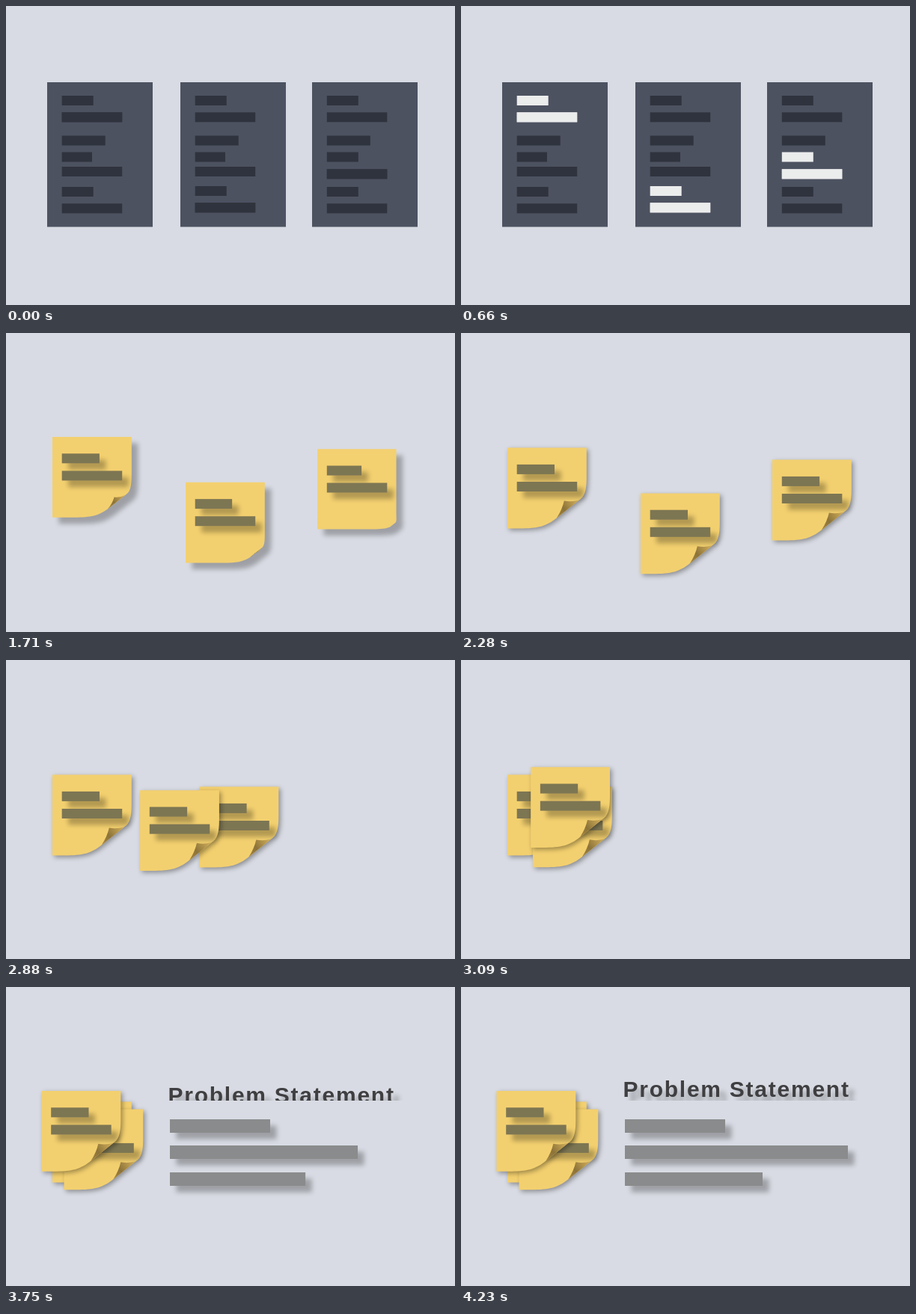
An HTML page with a canvas for the animation above (6.12 s loop, 600 by 400 pixels).

```html
<!DOCTYPE html>
<html lang="en">
<head>
<meta charset="utf-8">
<title>Problem Statement</title>
<style>
  html, body { margin: 0; width: 100%; height: 100%; overflow: hidden; background: #d8dbe3; }
  canvas { display: block; }
</style>
</head>
<body>
<canvas id="stage" width="600" height="400"></canvas>
<script>
const ctx = document.getElementById('stage').getContext('2d');
const LOOP = 6120;
const BG = '#d8dbe3', PAPER = '#4d5261';
const DARK = [47, 51, 61], WHITE = [255, 255, 255];
const YELLOW = [243, 208, 111], OLIVE = [125, 118, 83];
const STAGGER = 44, BAR = 13;

// Bars are [y, width]; "pick" is the first of the two bars that become a note.
const papers = [
  { x: 55, barX: 74.7, pick: 0, note: [62, 139],
    bars: [[120, 42], [142.3, 80.5], [173.5, 58], [195.5, 40.3], [215, 80.5], [242, 42], [264.3, 80.5]] },
  { x: 233, barX: 252.7, pick: 5, note: [240, 199.8],
    bars: [[120, 42], [142.3, 80.5], [173.5, 58], [195.5, 40.3], [215, 80.5], [241, 42], [263.3, 80.5]] },
  { x: 409, barX: 428.8, pick: 3, note: [416, 155],
    bars: [[120, 42], [142.3, 80.5], [173.5, 58], [195.5, 42], [218.3, 80.5], [242, 42], [264.3, 80.5]] }
];

const progress = (t, start, length) => Math.max(0, Math.min(1, (t - start) / length));
const lerp = (a, b, p) => a + (b - a) * p;
const sine = p => (1 - Math.cos(Math.PI * p)) / 2;
const quart = p => p < 0.5 ? 8 * p ** 4 : 1 - 8 * (1 - p) ** 4;
const cubicOut = p => 1 - (1 - p) ** 3;
const mix = (a, b, p) => `rgb(${a.map((v, i) => Math.round(lerp(v, b[i], p)))})`;

function rect(x, y, w, h, color) {
  ctx.fillStyle = color;
  ctx.fillRect(x, y, w, h);
}

function setShadow(alpha, offset, blur) {
  ctx.shadowColor = `rgba(0,0,0,${alpha})`;
  ctx.shadowOffsetX = ctx.shadowOffsetY = offset;
  ctx.shadowBlur = blur;
}

function drawPaper(paper, alpha) {
  ctx.globalAlpha = alpha;
  rect(paper.x, 102, 141, 193.5, PAPER);
  paper.bars.forEach(([y, w], i) => {
    if (i !== paper.pick && i !== paper.pick + 1) rect(paper.barX, y, w, BAR, mix(DARK, DARK, 0));
  });
  ctx.globalAlpha = 1;
}

// Sheet whose lower right corner is curled up by c (0..1).
function drawSheet(w, h, c, color, shadow) {
  const ax = w - 10 * c, ay = h - 38 * c;
  const bx = w - 40 * c, by = h - 14 * c;
  const s = Math.sqrt(c);
  ctx.beginPath();
  ctx.moveTo(0, 0);
  ctx.lineTo(w, 0);
  ctx.lineTo(w, ay - 30 * s);
  ctx.bezierCurveTo(w, ay - 12 * s, ax + 7 * s, ay - 4 * s, ax, ay);
  ctx.lineTo(bx, by);
  ctx.bezierCurveTo(bx - 14 * s, by + 11 * c, bx - 24 * s, h, bx - 50 * s, h);
  ctx.lineTo(0, h);
  ctx.closePath();
  ctx.fillStyle = color;
  setShadow(...shadow);
  ctx.fill();
  setShadow(0, 0, 0);

  const q = (c - 0.5) * 2;
  if (q <= 0) return;
  const tipX = lerp(w - 13, w - 30, q), tipY = lerp(h - 13, h - 37, q);
  const shade = ctx.createLinearGradient(bx, by, ax, ay);
  shade.addColorStop(0, '#a3853f');
  shade.addColorStop(0.4, '#8c7339');
  shade.addColorStop(1, '#d8b45d');
  ctx.beginPath();
  ctx.moveTo(bx, by);
  ctx.quadraticCurveTo(lerp(bx, tipX, 0.75), lerp(by, tipY, 0.5), tipX, tipY);
  ctx.quadraticCurveTo(lerp(tipX, ax, 0.5), tipY + 2 * q, ax, ay);
  ctx.closePath();
  ctx.fillStyle = shade;
  ctx.fill();
}

// Where the finished note sits, including the drop and the gathering into a pile.
function notePosition(i, t, drop) {
  let [x, y] = papers[i].note;
  y += 14.6 * drop;
  if (i === 1) {
    const p = sine(progress(t, 2610, 710));
    x = lerp(x, 47.5, p);
    y = lerp(139, y, (1 - p) ** 2);
  } else if (i === 2) {
    x = lerp(x, 77.5, sine(progress(t, 2610, 565)));
    y = lerp(y, 163.5, sine(progress(t, 3080, 160)));
  }
  return [x, y];
}

function drawNote(i, t) {
  const { barX, bars, pick, note } = papers[i];
  const delay = STAGGER * i;
  const [shortBar, longBar] = [bars[pick], bars[pick + 1]];
  const lit = sine(progress(t, 420, 300));
  const grow = quart(progress(t, 1143 + delay, 570));
  const curl = quart(progress(t, 1445 + delay, 440));
  const write = quart(progress(t, 1321 + delay, 440));
  const drop = sine(progress(t, 1765 + delay, 420));

  const [endX, endY] = notePosition(i, t, drop);
  const x = lerp(barX, endX, grow), y = lerp(shortBar[0], endY, grow);
  const w = lerp(shortBar[1], 105.8, grow), h = lerp(BAR, 107.8, grow);
  const lineX = barX + endX - note[0];
  const lineY = lerp(longBar[0], endY + 45.4, grow);
  const sheetColor = grow > 0 ? mix(WHITE, YELLOW, grow) : mix(DARK, WHITE, lit);
  const lineColor = grow > 0 ? mix(WHITE, OLIVE, grow) : mix(DARK, WHITE, lit);
  const shadow = [lerp(0.27, 0.36, drop) * Math.min(1, grow * 4), lerp(8.5, 2.5, drop), 6];

  if (grow < 0.9) {
    setShadow(...shadow);
    rect(lineX, lineY, longBar[1], BAR, lineColor);
  }
  ctx.save();
  ctx.translate(x, y);
  drawSheet(w, h, curl, sheetColor, shadow);
  ctx.restore();
  rect(lineX, y + 22.3, 50.3 * write, BAR, mix(OLIVE, OLIVE, 0));
  rect(lineX, lineY, longBar[1], BAR, lineColor);
}

function drawStatement(t) {
  const rise = 30 * (1 - cubicOut(progress(t, 3510, 690)));
  ctx.save();
  ctx.beginPath();
  ctx.rect(200, 110, 340, 42);
  ctx.clip();
  ctx.font = 'bold 30px "Liberation Sans", Arial, sans-serif';
  ctx.letterSpacing = '1.75px';
  ctx.fillStyle = '#3f3f41';
  if (t > 3510) ctx.fillText('Problem Statement', 216.5, 147 + rise);
  ctx.restore();

  const lines = [[177, 134, 3290, 430], [212, 298, 3367, 833], [248, 184, 3375, 500]];
  for (const [y, w, start, length] of lines) {
    rect(219, y, w * cubicOut(progress(t, start, length)), 18, '#8a8b8c');
  }
}

function draw(t) {
  rect(0, 0, 600, 400, BG);
  const fade = 1 - sine(progress(t, 1260, 430));
  if (fade > 0) papers.forEach(paper => drawPaper(paper, fade));
  [0, 2, 1].forEach(i => drawNote(i, t));
  drawStatement(t);
}

let origin = null;
function tick(now) {
  if (origin === null) origin = now;
  draw((now - origin) % LOOP);
  requestAnimationFrame(tick);
}
requestAnimationFrame(tick);
</script>
</body>
</html>
```
